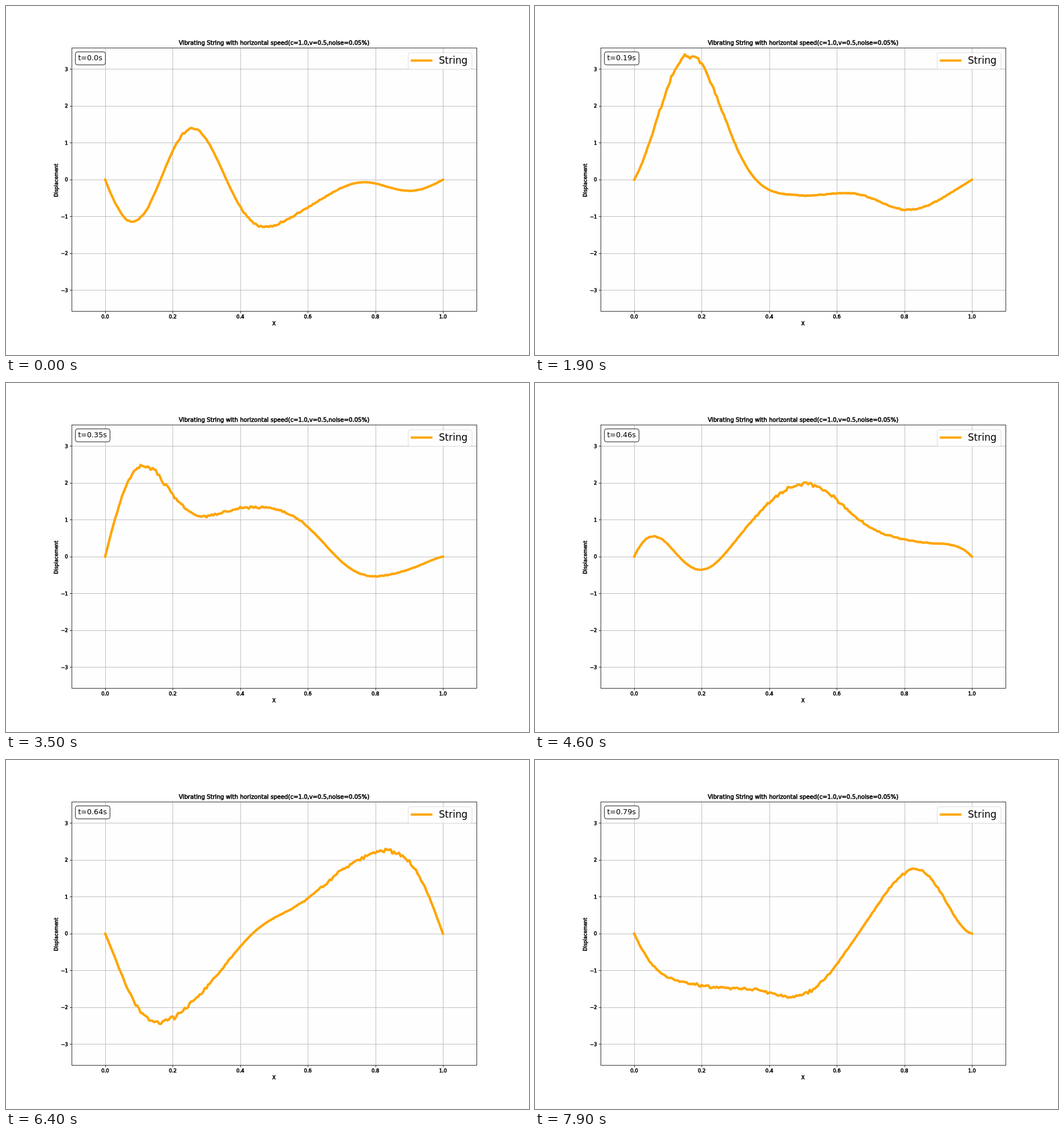
An HTML page for the animation above (8 s loop, 917 px wide and 611 px high).

```html
<!DOCTYPE html>
<html lang="en">
<head>
<meta charset="utf-8">
<title>Vibrating string</title>
<style>
  html, body { margin: 0; width: 100%; height: 100%; overflow: hidden; background: #fff; }
  svg { display: block; width: 917px; height: 611px; }
  text { font-family: "DejaVu Sans", sans-serif; font-size: 8.46px; fill: #000; }
  .heavy text { stroke: #000; stroke-width: .6px; }
  .heavy .title { font-size: 10.15px; }
  .grid { stroke: #b0b0b0; stroke-width: .8; }
  .tick { stroke: #000; stroke-width: .8; }
  .string { fill: none; stroke: #ffa500; stroke-width: 4.23; stroke-linecap: square; stroke-linejoin: round; }
</style>
</head>
<body>
<svg viewBox="0 0 917 611">
  <clipPath id="plot"><rect x="115" y="73" width="711" height="462"/></clipPath>
  <rect x="115" y="73" width="711" height="462" fill="#fefefe"/>
  <g id="axes" class="heavy">
    <text class="title" x="470" y="67.6" text-anchor="middle">Vibrating String with horizontal speed(c=1.0,v=0.5,noise=0.05%)</text>
    <text x="470" y="559" text-anchor="middle">X</text>
    <text transform="translate(90.8 305.3) rotate(-90)" text-anchor="middle">Displacement</text>
  </g>
  <path id="wave" class="string" clip-path="url(#plot)"/>
  <rect x="115.5" y="73.5" width="710" height="461" fill="none" stroke="#000" stroke-width=".8"/>
  <rect id="box" x="121.7" y="80.3" height="22.7" rx="3.5" fill="#fefefe" stroke="#000" stroke-width=".9"/>
  <text id="clock" x="126.4" y="95" style="font-size:12.69px"></text>
  <rect x="705.2" y="81.8" width="111.8" height="29.2" rx="3.4" fill="#fefefe" fill-opacity=".8" stroke="#ccc" stroke-width=".85" stroke-opacity=".8"/>
  <path class="string" d="M711.8 95.5H745.6"/>
  <text x="758.9" y="101.4" style="font-size:16.92px">String</text>
</svg>
<script>
const LOOP = 8000, STEP = 100, POINTS = 200, NOISE = 0.013;
const SPEED = 1, DRIFT = 0.5, START = -0.25;
const AMPS = [0.16, 1.03, 1.71, 0.74, 0.3];

const byId = id => document.getElementById(id);
const px = x => 173.9 + 592.25 * x;
const py = u => 304 - 64.53 * u;

function add(tag, attrs, label) {
  const el = document.createElementNS("http://www.w3.org/2000/svg", tag);
  for (const key in attrs) el.setAttribute(key, attrs[key]);
  if (label) el.textContent = label;
  byId("axes").append(el);
}

// Grid lines sit on pixel centres.
for (let i = 0; i <= 5; i++) {
  const x = px(i / 5), line = Math.round(x) + 0.5;
  add("path", { class: "grid", d: `M${line} 73.5V534.5` });
  add("path", { class: "tick", d: `M${line} 534.5v3.5` });
  add("text", { x, y: 547.4, "text-anchor": "middle" }, (i / 5).toFixed(1));
}
for (let u = -3; u <= 3; u++) {
  const y = py(u), line = Math.floor(y + 0.2) + 0.5;
  add("path", { class: "grid", d: `M115.5 ${line}H825.5` });
  add("path", { class: "tick", d: `M115.5 ${line}h-3.5` });
  add("text", { x: 108.7, y: y + 3.2, "text-anchor": "end" }, String(u).replace("-", "\u2212"));
}

// Standing modes of a string that drifts between two fixed ends.
function height(x, t) {
  const phase = START + (SPEED ** 2 - DRIFT ** 2) * t + DRIFT * x;
  return AMPS.reduce((sum, amp, i) => {
    const k = (i + 1) * Math.PI;
    return sum + amp * Math.sin(k * x) * Math.cos(k * phase);
  }, 0);
}

function random(seed) {
  return () => {
    seed = (seed + 0x6d2b79f5) | 0;
    let z = Math.imul(seed ^ (seed >>> 15), 1 | seed);
    z = (z + Math.imul(z ^ (z >>> 7), 61 | z)) ^ z;
    return ((z ^ (z >>> 14)) >>> 0) / 4294967296;
  };
}

function draw(step) {
  const t = step / 100, rnd = random(step * 977 + 5);
  const bell = () => 2 * (rnd() + rnd() + rnd() - 1.5);
  let d = "";
  for (let i = 0; i <= POINTS; i++) {
    const x = i / POINTS, u = height(x, t) * (1 + NOISE * bell());
    d += (i ? "L" : "M") + px(x).toFixed(2) + " " + py(u).toFixed(2);
  }
  byId("wave").setAttribute("d", d);
  const label = step ? String(t) : "0.0";
  byId("clock").textContent = `t=${label}s`;
  byId("box").setAttribute("width", 52.6 + 8 * (label.length - 3));
}

let shown = -1;
function tick() {
  const step = Math.floor((performance.now() % LOOP) / STEP);
  if (step !== shown) draw(shown = step);
  requestAnimationFrame(tick);
}
tick();
</script>
</body>
</html>
```
